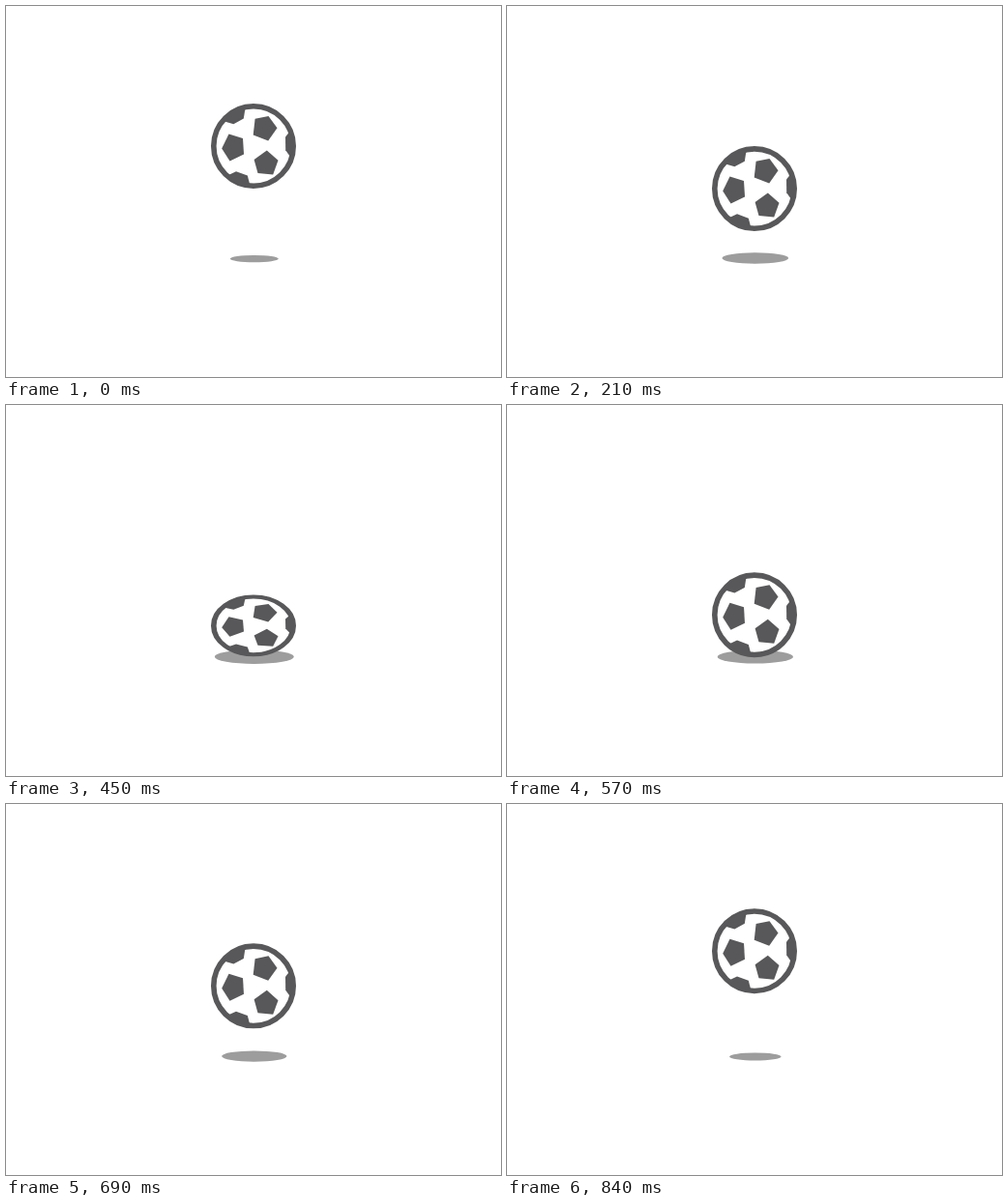
Recreate the animation shown at these times as an HTML page. Size 512 by 384 pixels, loop 0.87 s.

```html
<!DOCTYPE html>
<html lang="en">
<head>
<meta charset="utf-8">
<title>Bouncing ball</title>
<style>
  html, body { margin: 0; width: 100%; height: 100%; overflow: hidden; background: #fff; }
  svg { display: block; width: 512px; height: 384px; }
</style>
</head>
<body>
<svg viewBox="0 0 512 384">
  <ellipse id="shadow" cx="256.8" fill="#9d9d9d"/>
  <g id="ball" fill="#58585a">
    <circle r="41.2" fill="#fff" stroke="#58585a" stroke-width="5.6"/>
    <path d="M1.6-28.2 15.5-31 24.5-18.7 15.2-5.5-.3-11.5Z"/>
    <path d="M13.8 4.5 25.5 14.8 20.2 29.5 4.5 28 .6 14Z"/>
    <path d="M-25.5-12.6-11-8-10 8.5-24.5 15.5-32.8 2.5Z"/>
    <path d="M-30-25.6-20.6-22.8-10.2-28.4-8.6-38.5-9-41-22-36Z"/>
    <path d="M-27 30.5-18 26.3-6.2 30.6-4 39-5 42-18 38Z"/>
    <path d="M37-14.5 33-9.5 33.2 4.3 37.6 10.5 41 5 41-8Z"/>
  </g>
</svg>
<script>
const LOOP = 870, STEP = 30;
const ball = document.getElementById('ball');
const shadow = document.getElementById('shadow');

// Linear interpolation through [time, value] keys
function track(keys, t) {
  let i = 1;
  while (i < keys.length - 1 && t > keys[i][0]) i++;
  const [t0, a] = keys[i - 1], [t1, b] = keys[i];
  return a + (b - a) * (t - t0) / (t1 - t0);
}

const height = [[0, 145], [348, 218], [450, 228.4], [567, 218], [870, 145]];
const squash = [[0, 1], [348, 1], [450, 0.725], [567, 1], [870, 1]];
const spread = [[0, 0], [360, 1], [531, 1], [878, 0]];

function draw(t) {
  const s = track(spread, t);
  ball.setAttribute('transform',
    `translate(256 ${track(height, t)}) scale(1 ${track(squash, t)})`);
  shadow.setAttribute('rx', 25 + 16 * s);
  shadow.setAttribute('ry', 3.6 + 3.7 * s);
  shadow.setAttribute('cy', 261.6 - s);
}

function tick() {
  const t = performance.now() % LOOP;
  draw(Math.floor(t / STEP) * STEP);
  requestAnimationFrame(tick);
}
tick();
</script>
</body>
</html>
```
